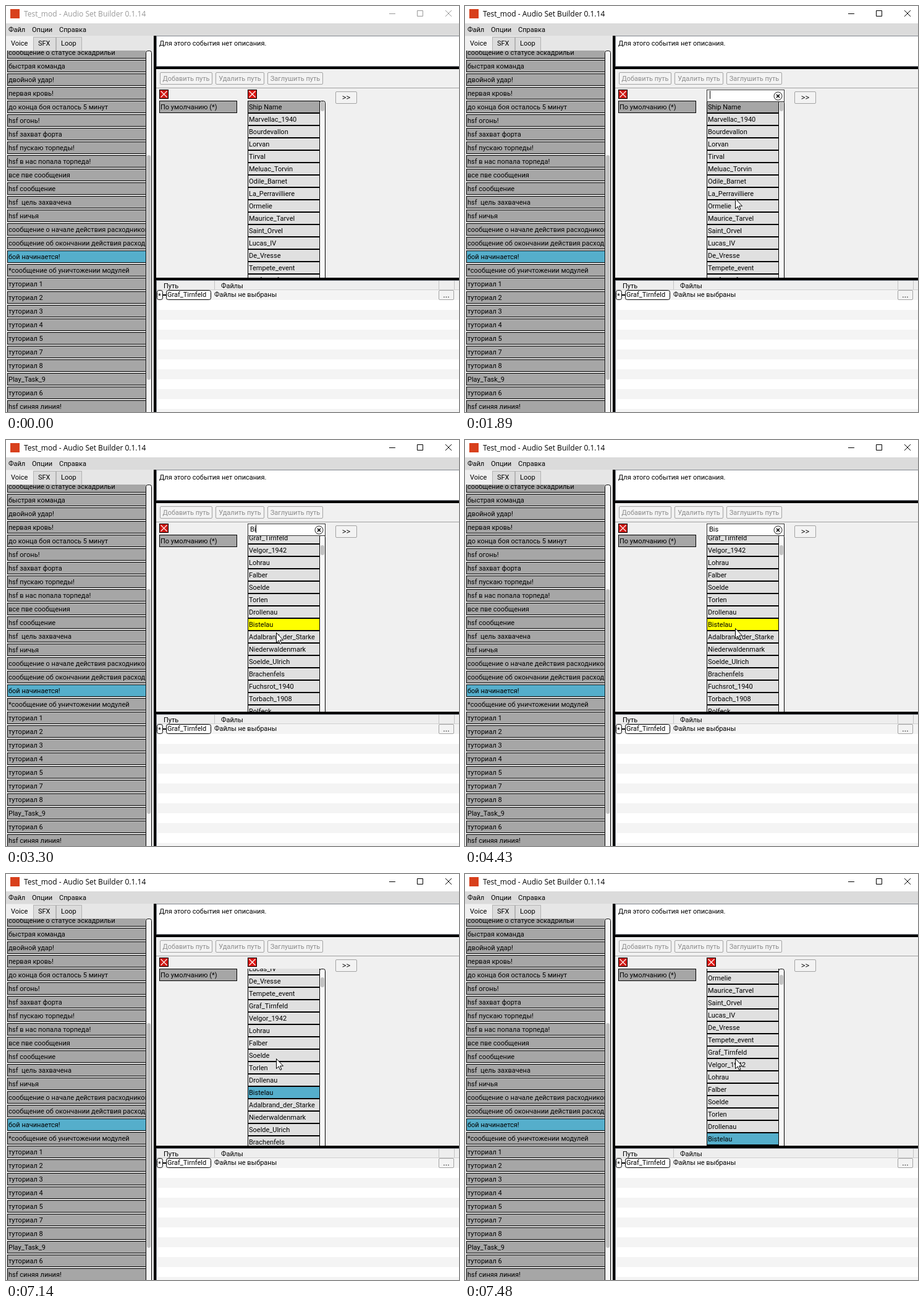
Animation, 733 px wide and 656 px high, one loop 8000 ms. Source, as an HTML page:

```html
<!DOCTYPE html>
<html lang="ru">
<head>
<meta charset="utf-8">
<title>Audio Set Builder</title>
<style>
html, body { margin: 0; width: 100%; height: 100%; overflow: hidden; background: #fff; }
svg { display: block; }
text { font: 11px Roboto, "Liberation Sans", sans-serif; white-space: pre; }
.title { font: 12px "Open Sans", "Noto Sans", sans-serif; }
.wide { font-size: 13px; }
rect { shape-rendering: crispEdges; }
rect[rx] { shape-rendering: auto; }
</style>
</head>
<body>
<svg id="stage" width="733" height="656" viewBox="0 0 733 656"></svg>
<script>
const LOOP = 8000, TEAL = '#55aecb', GREY = '#a6a6a6', CELL = '#e0e0e0', EDGE = '#828790';

const events = ['сообщение о статусе эскадрильи', 'быстрая команда', 'двойной удар!', 'первая кровь!',
  'до конца боя осталось 5 минут', 'hsf огонь!', 'hsf захват форта', 'hsf пускаю торпеды!',
  'hsf в нас попала торпеда!', 'все пве сообщения', 'hsf сообщение', 'hsf  цель захвачена', 'hsf ничья',
  'сообщение о начале действия расходников', 'сообщение об окончании действия расходников',
  'бой начинается!', '*сообщение об уничтожении модулей', 'туториал 1', 'туториал 2', 'туториал 3',
  'туториал 4', 'туториал 5', 'туториал 7', 'туториал 8', 'Play_Task_9', 'туториал 6', 'hsf синяя линия!'];

const ships = ['Ship Name', 'Marvellac_1940', 'Bourdevallon', 'Lorvan', 'Tirval', 'Meluac_Torvin',
  'Odile_Barnet', 'La_Perravilliere', 'Ormelie', 'Maurice_Tarvel', 'Saint_Orvel', 'Lucas_IV', 'De_Vresse',
  'Tempete_event', 'Graf_Tirnfeld', 'Velgor_1942', 'Lohrau', 'Falber', 'Soelde', 'Torlen', 'Drollenau',
  'Bistelau', 'Adalbrand_der_Starke', 'Niederwaldenmark', 'Soelde_Ulrich', 'Brachenfels',
  'Fuchsrot_1940', 'Torbach_1908', 'Rolfeck'];
const PICKED = 21;

const box = (x, y, w, h, fill, line, rx) => line
  ? `<rect x="${x + .5}" y="${y + .5}" width="${w - 1}" height="${h - 1}" fill="${fill}" stroke="${line}"${rx ? ` rx="${rx}"` : ''}/>`
  : `<rect x="${x}" y="${y}" width="${w}" height="${h}" fill="${fill}"${rx ? ` rx="${rx}"` : ''}/>`;
const text = (x, y, s, fill = '#000', extra = '') => `<text x="${x}" y="${y}" fill="${fill}" ${extra}>${s}</text>`;
const path = (d, stroke, width = 1) => `<path d="${d}" fill="none" stroke="${stroke}" stroke-width="${width}"/>`;
const button = (x, y, w, h, s, color, style = '') => box(x, y, w, h, '#f3f3f3', '#a3a3a3', 1.5)
  + text(x + w / 2, y + h / 2 + 4, s, color, `text-anchor="middle" class="${style}"`);
const track = (x, y, h) => box(x, y, 10, h, '#f7f7f7', '#000', 3);
const cross = (x, red, id) => `<g id="${id}">` + box(x, 135, 15, 15, red, '#000')
  + path(`M${x + 2.5} 137.5l10 10m0-10l-10 10`, '#fff', 1.2) + '</g>';

function header() {
  return box(0, 0, 733, 28, '#fff') + box(7, 5, 15, 15, '#d8401c')
    + `<g id="chrome">` + text(29, 17, 'Test_mod - Audio Set Builder 0.1.14', 'currentColor', 'class="title"')
    + path('M620 12.5h10M665.5 7.5h9v9h-9zM711 7l10 10m0-10l-10 10', 'currentColor') + '</g>'
    + box(0, 28, 733, 20, '#dbdbdb')
    + text(4, 42, 'Файл') + text(42, 42, 'Опции') + text(86, 42, 'Справка');
}

function eventList() {
  const rows = events.map((s, i) => {
    const y = 65 + i * 22;
    return box(2, y, 225, 20, i == 15 ? TEAL : GREY, '#000') + text(4, y + 14, s);
  }).join('');
  return box(0, 48, 239, 608, '#e6e6e6')
    + box(44, 50, 37, 23, '#dcdcdc', '#b4b4b4') + box(81, 50, 42, 23, '#dcdcdc', '#b4b4b4')
    + box(0, 49, 44, 24, '#f0f0f0')
    + text(8, 64, 'Voice') + text(52, 64, 'SFX') + text(89, 64, 'Loop')
    + `<g clip-path="url(#left)">${rows}</g>`
    + track(226, 72, 600) + box(228, 241, 6, 363, '#c1c1c1', '', 3);
}

function pathPanel() {
  return box(243, 102, 490, 337, '#f0f0f0')
    + button(249, 107, 85, 20, 'Добавить путь', '#8c8c8c')
    + button(339, 107, 79, 20, 'Удалить путь', '#8c8c8c')
    + button(423, 107, 90, 20, 'Заглушить путь', '#8c8c8c')
    + box(243, 132, 490, 1, '#a0a0a0')
    + cross(248, '#cf1712', 'first') + box(248, 153, 126, 20, GREY, '#000') + text(250, 167, 'По умолчанию (*)')
    + button(533, 138, 35, 20, '&gt;&gt;', '#222', 'wide');
}

function shipList() {
  const rows = ships.map((s, i) => {
    const y = 153 + i * 20;
    return box(391, y, 117, 20, i ? CELL : GREY, '#000') + text(393, y + 14, s);
  }).join('');
  return `<g clip-path="url(#right)"><g id="rows">${rows}</g>` + track(507, 153, 300)
    + box(509, 154, 6, 16, '#c1c1c1', '', 3).replace('<rect', '<rect id="thumb"') + '</g>'
    + cross(391, '#dd1510', 'second')
    + '<g id="search">' + box(391, 135, 126, 20, '#fff', '#333') + text(395, 148, '', '#000', 'id="query"')
    + box(396, 137, 1, 13, '#000').replace('<rect', '<rect id="caret"')
    + '<circle cx="506.5" cy="145.5" r="6.5" fill="#fff" stroke="#222"/>'
    + path('M504 143l5 5m0-5l-5 5', '#000', 1.6) + '</g>';
}

function fileTable() {
  let out = box(243, 443, 490, 213, '#fff');
  for (let y = 459; y < 656; y += 32) out += box(243, y, 490, 16, '#f4f4f4');
  out += box(243, 443, 490, 16, '#eeeeee') + box(243, 458, 490, 1, '#d0d0d0')
    + box(243, 443, 490, 1, EDGE) + box(243, 443, 1, 213, EDGE);
  for (const x of [337, 700, 725]) out += box(x, 444, 1, 14, '#c4c4c4');
  return out + text(255, 456, 'Путь') + text(348, 456, 'Файлы')
    + box(253, 466, 7, 2, '#000')
    + box(244, 459, 10, 16, '#fff', '#000', 3) + text(246, 472, '*')
    + box(259, 459, 73, 16, '#fff', '#000', 3) + text(261, 470, ships[14])
    + text(337, 470, 'Файлы не выбраны') + button(700, 459, 25, 16, '...', '#000', 'wide');
}

const clip = (id, x, y, w, h) => `<clipPath id="${id}"><rect x="${x}" y="${y}" width="${w}" height="${h}"/></clipPath>`;
document.getElementById('stage').innerHTML = clip('left', 0, 72, 226, 584) + clip('right', 391, 153, 126, 286)
  + header() + eventList() + box(243, 48, 491, 50, '#fff', EDGE) + text(248, 64, 'Для этого события нет описания.')
  + pathPanel() + shipList() + fileTable()
  + box(239, 48, 4, 608, '#000') + box(243, 98, 490, 4, '#000') + box(243, 439, 490, 4, '#000')
  + '<path id="cursor" d="M.5.5v16l3.7-3.5 2.5 5.7 2.3-1-2.5-5.5h5z" fill="#fff" stroke="#000"/>';

const $ = id => document.getElementById(id);
const cells = [...$('rows').querySelectorAll('rect')];
const show = (id, on) => $(id).setAttribute('visibility', on ? 'visible' : 'hidden');
// Value of the last [time, value] pair that has been reached.
const at = (t, steps) => steps.reduce((v, [time, next]) => t >= time ? next : v, steps[0][1]);

function cursorAt(t) {
  if (t < 130) return [800, 700];
  if (t < 1010) {
    const p = Math.floor((t - 130) / 80) / 10, e = p + .4 * p * (1 - p);
    return [648 - 173 * e, 648 - 294 * e];
  }
  return at(t, [[1010, [459, 335]], [1080, [444, 318]], [1150, [437, 311]], [4430, [437, 304]], [4510, [437, 298]]]);
}

function draw(t) {
  const open = t >= 1720 && t < 4990;
  const query = at(t, [[0, ''], [2830, 'B'], [3300, 'Bi'], [3600, 'Bis'], [4910, '']]);
  const scroll = at(t, [[0, 0], [3300, 285], [7140, 230], [7230, 210], [7310, 192], [7390, 174], [7480, 155]]);
  const caret = at(t, [[0, 0], [1890, 1], [2270, 0], [2500, 1], [4100, 0], [4660, 1], [4910, 0]]);

  $('chrome').setAttribute('color', t < 1490 ? '#999' : '#000');
  show('second', !open);
  show('search', open);
  show('caret', open && caret);
  $('query').textContent = query;
  $('caret').setAttribute('x', [396, 402, 404, 409][query.length]);
  $('rows').setAttribute('transform', `translate(0 ${-scroll})`);
  $('thumb').setAttribute('y', 154 + Math.round(scroll * .055));
  cells.forEach((cell, i) => cell.setAttribute('fill',
    !i ? GREY : t >= 4910 && i == PICKED ? TEAL : query && ships[i].includes(query) ? '#ff0' : CELL));
  const [x, y] = cursorAt(t).map(Math.round);
  $('cursor').setAttribute('transform', `translate(${x} ${y})`);
}

const start = performance.now();
function tick() {
  draw((performance.now() - start) % LOOP);
  requestAnimationFrame(tick);
}
tick();
</script>
</body>
</html>
```
